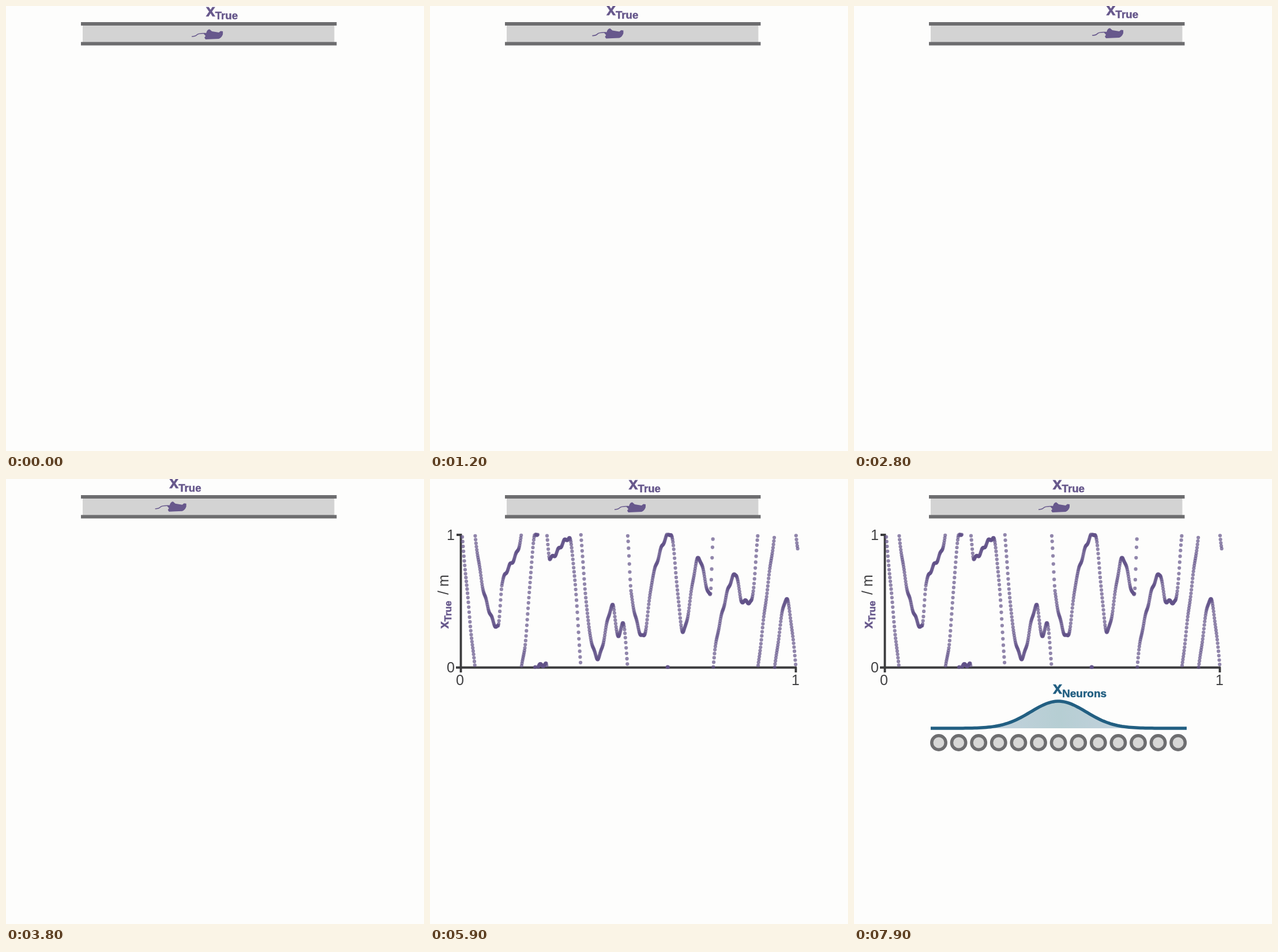
An HTML page for the animation above (8 s loop, 725x773 px).

```html
<!DOCTYPE html>
<html lang="en">
<head>
<meta charset="utf-8">
<title>Position decoding</title>
<style>
  html, body { margin: 0; height: 100%; overflow: hidden; background: #fdfdfc; }
  svg { display: block; width: 100%; height: 100%; font-family: "Liberation Sans", Arial, sans-serif; }
  .bold { font-weight: bold; stroke-width: .5; }
  .purple { fill: #67588c; stroke: #67588c; }
  .teal { fill: #225f82; stroke: #225f82; }
  .axis { fill: none; stroke: #3b3b3d; stroke-width: 3.8; }
  .num { font-size: 25px; fill: #404042; text-anchor: middle; }
</style>
</head>
<body>
<svg viewBox="0 0 725 773">
  <defs>
    <linearGradient id="hill">
      <stop offset=".2" stop-color="#c4d2de"/>
      <stop offset=".5" stop-color="#b6ced3"/>
      <stop offset=".8" stop-color="#c4d2de"/>
    </linearGradient>
  </defs>

  <rect x="133" y="33" width="436.500" height="31" fill="#d3d3d3"/>
  <path d="M130 31 H573.500 M130 65.500 H573.500" stroke="#6d6d6f" stroke-width="6"/>

  <g id="mouse">
    <path d="M320 53 Q326 53 329 50 T344 47.500" fill="none" stroke="#67588c" stroke-width="1.600"/>
    <path d="M340 47.500 L345 47 Q347 40 351 40.500 L355 44 L367 46 L370 43.500 L374 44 V49
             Q372 55 367 57 L355 57.500 L344 58 L342 55 L344 52 Z" fill="#67588c"/>
    <g class="bold purple">
      <text x="344.500" y="17.500" font-size="29">x</text>
      <text x="360.500" y="23" font-size="18.700">True</text>
    </g>
  </g>

  <g id="plot">
    <path class="axis" d="M46 97 H53.500 V336 M45 327.500 H636 M634.500 327 V336"/>
    <text class="num" x="36" y="106">1</text>
    <text class="num" x="36" y="336">0</text>
    <text class="num" x="52" y="358">0</text>
    <text class="num" x="634" y="358">1</text>
    <g transform="translate(32 260) rotate(-90)">
      <text class="bold purple" font-size="23">x</text>
      <text class="bold purple" x="12.500" y="5" font-size="17">True</text>
      <text x="59" font-size="25" fill="#404042">/ m</text>
    </g>
    <g id="dots" fill="#625389" fill-opacity=".7"></g>
  </g>

  <g id="neurons">
    <g class="bold teal">
      <text x="345" y="373" font-size="29">x</text>
      <text x="361" y="378.500" font-size="19">Neurons</text>
    </g>
    <path id="bump" fill="url(#hill)" stroke="#225f82" stroke-width="5.500"/>
    <g id="cells" fill="#d7d7d6" stroke="#6e6e70" stroke-width="5.500"></g>
  </g>
</svg>

<script>
const $ = id => document.getElementById(id);
const LOOP = 8000, STEP = 100, RUN = 4800, PLOT_AT = 5900, NEURONS_AT = 7000;

// Monotone cubic curve through [position, value] pairs
function curve(points) {
  const last = points.length - 1;
  const slope = i => (points[i + 1][1] - points[i][1]) / (points[i + 1][0] - points[i][0]);
  const tangent = points.map((_, i) => {
    if (i === 0) return slope(0);
    if (i === last) return slope(last - 1);
    const a = slope(i - 1), b = slope(i);
    return a * b <= 0 ? 0 : 2 * a * b / (a + b);
  });
  return p => {
    if (p >= points[last][0]) return points[last][1];
    let i = 0;
    while (p >= points[i + 1][0]) i++;
    const [x0, y0] = points[i], [x1, y1] = points[i + 1];
    const w = x1 - x0, s = (p - x0) / w, r = 1 - s;
    return (1 + 2 * s) * r * r * y0 + s * r * r * w * tangent[i]
      + s * s * (3 - 2 * s) * y1 - s * s * r * w * tangent[i + 1];
  };
}

function circle(parent, cx, cy, r) {
  const el = document.createElementNS("http://www.w3.org/2000/svg", "circle");
  el.setAttribute("cx", cx);
  el.setAttribute("cy", cy);
  el.setAttribute("r", r);
  parent.append(el);
}

// Turning points on the circular track in percent, unwrapped
const track = curve([
  [56, 97], [78, 0], [96, -48], [118, -70], [125, -37], [153, -11], [164, 14], [183, 100],
  [201, 102], [208, 82], [241, 97], [269, -41], [277, -74], [291, -93], [317, -54], [327, -78],
  [334, -66], [343, -100], [349, -145], [370, -177], [387, -131], [417, -99.5], [439, -173],
  [466, -118], [486, -146], [491, -101], [501, -70], [531, -30], [540, -50], [557, -51],
  [569, 0], [598, 100], [618, 151], [638, 89]
]);
const wobble = x => 1.2 * Math.sin(x * 0.6);
for (let x = 56; x <= 638; x += 0.7) {
  const u = track(x) + wobble(x);
  const lap = u - 100 * Math.floor(u / 100);
  circle($("dots"), x.toFixed(1), (327 - 2.31 * lap).toFixed(1), 3.1);
}

let bump = "";
for (let x = 133; x <= 577; x += 4) {
  const y = 433 - 47 * Math.exp(-(((x - 354.5) / 48) ** 2) / 2);
  bump += (bump ? "L" : "M") + x + " " + y.toFixed(2);
}
$("bump").setAttribute("d", bump);
for (let i = 0; i < 13; i++) circle($("cells"), 147 + i * 34.6, 458, 12.2);

// The mouse runs back and forth twice, then slows to a stop
const laps = curve([
  [0, 0.002], [1200, 0.536], [2100, 0.986], [2800, 1.409], [3800, 1.942], [4500, 1.996], [RUN, 2]
]);

function draw(now) {
  const t = Math.floor((now % LOOP) / STEP) * STEP;
  const x = 172 * Math.sin(2 * Math.PI * laps(t));
  const y = -2 * Math.sin(Math.PI * Math.min(t / RUN, 1));
  $("mouse").setAttribute("transform", `translate(${x.toFixed(2)} ${y.toFixed(2)})`);
  $("plot").style.display = t >= PLOT_AT ? "" : "none";
  $("neurons").style.display = t >= NEURONS_AT ? "" : "none";
}

const start = performance.now();
function tick() {
  draw(performance.now() - start);
  requestAnimationFrame(tick);
}
tick();
</script>
</body>
</html>
```
